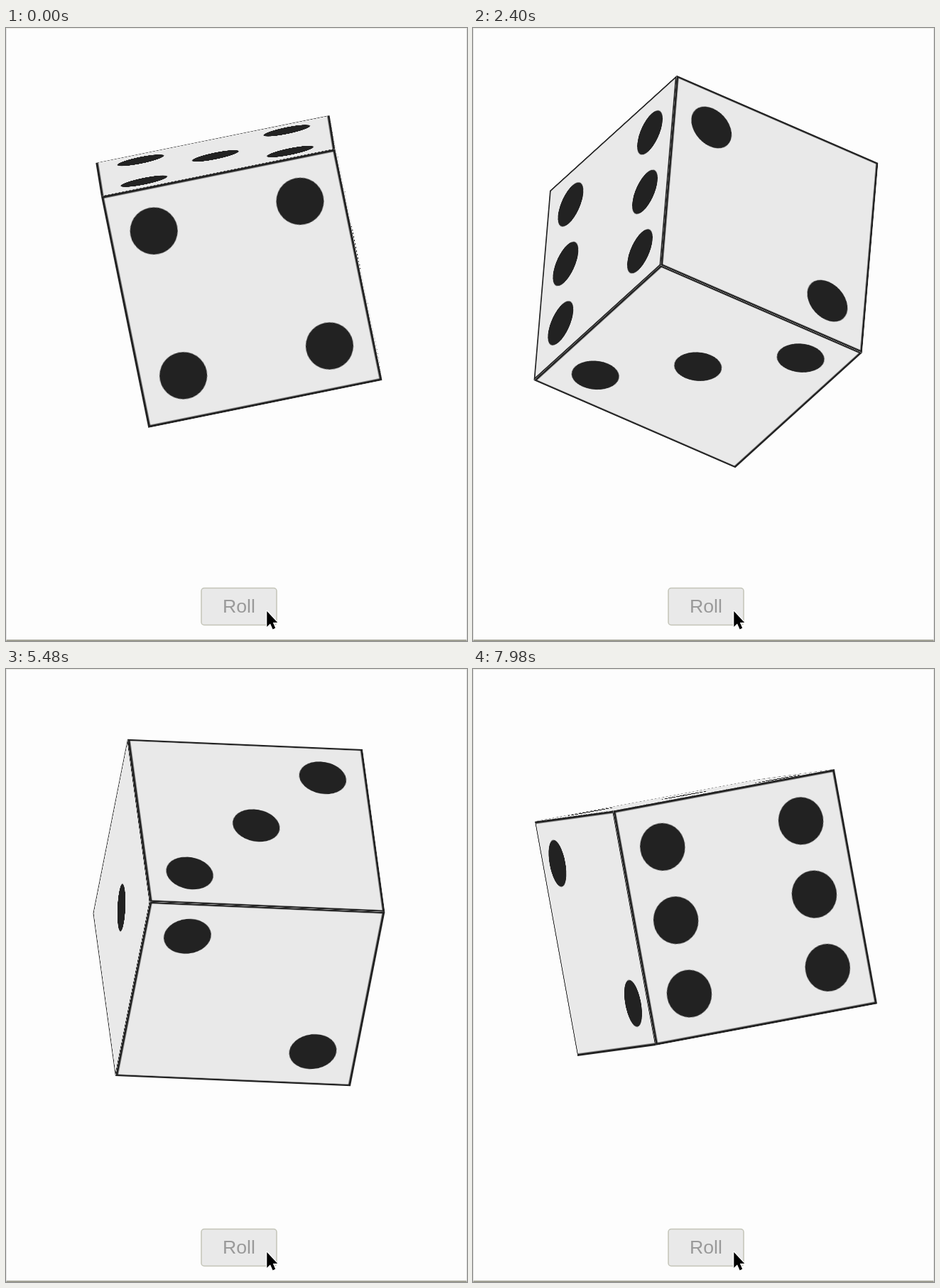
Write an HTML page that moves like this. It is 649 px wide and 863 px high and loops after 8 s.

```html
<!DOCTYPE html>
<html lang="en">
<head>
<meta charset="utf-8">
<title>Dice roll</title>
<style>
  html, body { margin: 0; width: 100%; height: 100%; overflow: hidden; }
  body { position: relative; background: #fdfdfd; }
  .frame {
    position: absolute; inset: 0; box-sizing: border-box;
    border: 1px solid #e2e2e2; border-top-color: #ebebe4; border-bottom: 2px solid #a3a396;
  }
  .die {
    position: absolute; left: 328px; top: 343px; width: 0; height: 0;
    transform-style: preserve-3d;
  }
  .die svg {
    position: absolute; left: -168px; top: -168px; width: 336px; height: 336px;
    backface-visibility: hidden;
  }
  .die rect { fill: #e9e9e9; stroke: #222; stroke-width: 3.4; }
  .die circle { fill: #222; }
  .ui { position: absolute; left: 0; top: 0; }
  .ui text { font: 26.67px "Liberation Sans", Arial, sans-serif; fill: #999; text-anchor: middle; }
</style>
</head>
<body>
<div class="frame"></div>
<div class="die" id="die"></div>
<svg class="ui" width="649" height="863">
  <rect x="275" y="788.5" width="106" height="52" rx="4" fill="#e9e9e9" stroke="#c3c4b8" stroke-width="1.5"/>
  <text x="328" y="823">Roll</text>
  <path d="M367.3 821V843L372 838.4L375.6 846.4L379.2 844.8L375.8 837H382.2Z"
        fill="#000" stroke="#fff" stroke-width="2.4" stroke-linejoin="round" paint-order="stroke"/>
</svg>
<script>
  const LOOP = 8000, SIZE = 336, LO = 63, MID = 168, HI = 273;
  const die = document.getElementById('die');

  const corners = [[LO, LO], [HI, LO], [LO, HI], [HI, HI]];
  const faces = [
    ['rotateY(90deg)', [[MID, MID]]],
    ['rotateX(-90deg)', [[LO, LO], [HI, HI]]],
    ['rotateY(180deg)', [[HI, LO], [MID, MID], [LO, HI]]],
    ['rotateY(0deg)', corners],
    ['rotateX(90deg)', [...corners, [MID, MID]]],
    ['rotateY(-90deg)', [...corners, [MID, LO], [MID, HI]]]
  ];

  die.innerHTML = faces.map(([turn, pips]) => `
    <svg viewBox="0 0 ${SIZE} ${SIZE}" style="transform:${turn} translateZ(${SIZE / 2}px)">
      <rect x="1.7" y="1.7" width="${SIZE - 3.4}" height="${SIZE - 3.4}"/>
      ${pips.map(([x, y]) => `<circle cx="${x}" cy="${y}" r="33.5"/>`).join('')}
    </svg>`).join('');

  // Slowing spin: [seconds, degrees, degrees per second]
  const spin = [
    [0, 11.3, 180], [1.52, 235.5, 118], [2.4, 327.6, 92], [3.8, 436.1, 66],
    [5.48, 530.1, 46], [6.32, 565.2, 37], [8, 611.2, 18]
  ];

  function spinAt(t) {
    let i = 0;
    while (i < spin.length - 2 && t >= spin[i + 1][0]) i++;
    const [t0, a, va] = spin[i], [t1, b, vb] = spin[i + 1];
    const d = t1 - t0, u = (t - t0) / d, w = 1 - u;
    return w * w * (a * (1 + 2 * u) + va * d * u) + u * u * (b * (1 + 2 * w) - vb * d * w);
  }

  // The picture rests for 100 ms twice in every 840 ms.
  function held(ms) {
    const phase = ms % 840;
    for (const rest of [440, 720]) {
      if (phase >= rest && phase < rest + 100) return ms - phase + rest;
    }
    return ms;
  }

  const start = performance.now();
  function draw() {
    const ms = (performance.now() - start) % LOOP;
    const s = spinAt(held(ms) / 1000);
    die.style.transform = `rotateX(${-s / 7}deg) rotateZ(${-s}deg) rotateX(${-4 * s / 7}deg)`;
    requestAnimationFrame(draw);
  }
  draw();
</script>
</body>
</html>
```
